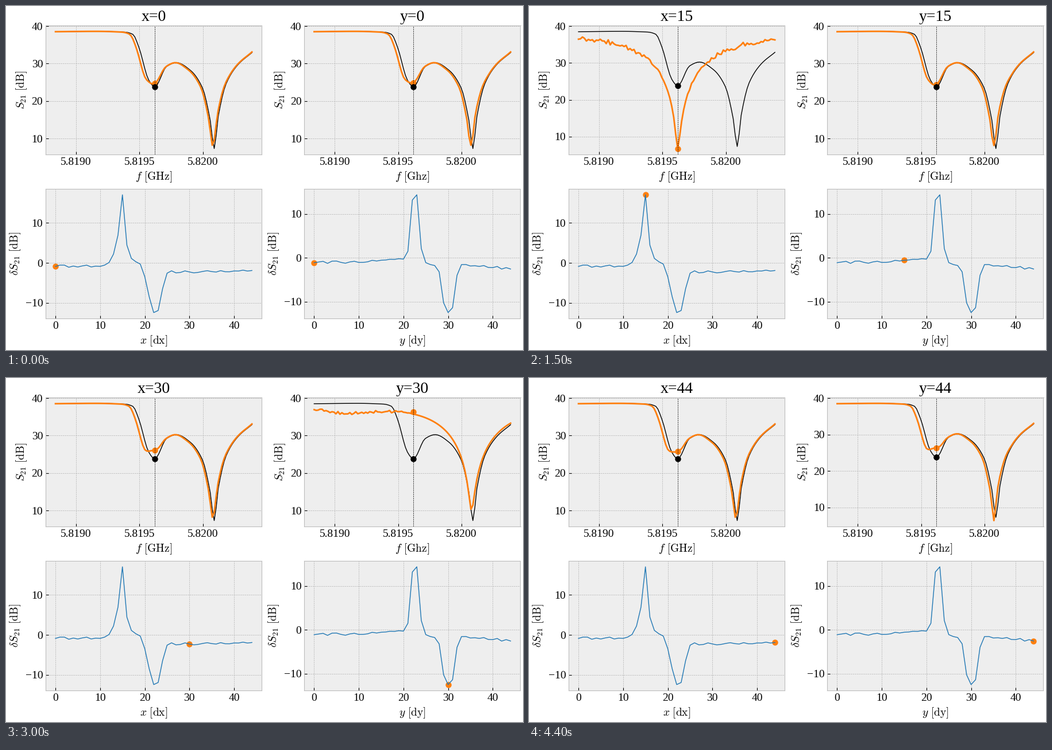
These frames come from a looping animation (900 px wide and 600 px high, 4.5 s). A matplotlib script:

```python
import numpy as np
import matplotlib.pyplot as plt
from matplotlib.animation import FuncAnimation

W, H, DPI = 900, 600, 100
FRAMES, N, MID = 45, 100, 50
ORANGE, BLUE = "#ff7f0e", "#1f77b4"

plt.rcParams.update({
    "font.family": "Liberation Serif", "font.size": 14,
    "mathtext.fontset": "cm",
    "axes.facecolor": "#eeeeee", "axes.edgecolor": "#bcbcbc",
    "axes.grid": True, "axes.axisbelow": True,
    "axes.titlesize": 20, "axes.labelsize": 14,
    "grid.color": "#b2b2b2", "grid.linestyle": "--", "grid.linewidth": 0.5,
    "xtick.direction": "in", "ytick.direction": "in",
})

rng = np.random.default_rng(4)
idx = np.arange(N)
freq = np.linspace(5.818837, 5.820387, N)
steps = np.arange(FRAMES)


def smooth(*points):
    """Monotone cubic through a few (index, dB) points."""
    x, y = np.array(points, float).T
    h, m = np.diff(x), np.diff(y) / np.diff(x)
    prod = m[:-1] * m[1:]
    same = prod > 0
    inner = np.where(same, 2 * prod / np.where(same, m[:-1] + m[1:], 1), 0)
    d = np.concatenate([m[:1], inner, m[-1:]])
    j = np.clip(np.searchsorted(x, idx, side="right") - 1, 0, len(h) - 1)
    t = (idx - x[j]) / h[j]
    ease = t * t * (3 - 2 * t)
    return (y[j] + (y[j + 1] - y[j]) * ease
            + h[j] * t * (1 - t) * (d[j] * (1 - t) - d[j + 1] * t))


def notch(top, at, low, left, right):
    """Resonance dip in dB with its own width on each side."""
    x = idx - at
    b = np.where(x < 0, left, right)
    a = b * 10 ** ((low - top) / 20)
    return top + 10 * np.log10((x**2 + a**2) / (x**2 + b**2))


def rough(size):
    """Noise that fades out towards the marked frequency."""
    return size * rng.normal(size=N) * np.clip(abs(idx - MID) / 10, 0, 1)


def hump(x, at, height, left, right, power):
    width = np.where(x < at, left, right)
    return height * np.exp(-(abs(x - at) / width) ** power)


def change(drift, *humps):
    """Signal change along a scan: slow drift, a peak and a trough."""
    peaks = sum(hump(steps, *h) for h in humps)
    jitter = rng.uniform(-.3, .3, FRAMES) / (1 + abs(peaks))
    return np.interp(steps, *zip(*drift)) + peaks + jitter


REF = smooth((0, 38.5), (22, 38.6), (35, 38.4), (39, 37.8), (42, 34.4),
             (47, 25.6), (50, 23.8), (56, 29.2), (61, 30.25), (68, 28.2),
             (74, 23.6), (78, 14.8), (80, 7.3), (82, 15.8), (86, 24.6),
             (92, 29.7), (99, 32.9))

# Responses with only the first notch (deep) or only the second (flat).
DEEP_X = notch(38, 50, 6.7, 30, 34) + rough(.3)
DEEP_Y = smooth((0, 38.4), (22, 37.5), (32, 36.3), (40, 32.8), (44, 26.1),
                (47, 19.3), (50, 9.4), (52, 16), (60, 20.8), (70, 27),
                (80, 32.2), (99, 35.7)) + rough(.4)
left_half = idx < MID
FLAT_X = (notch(38.5, 79, 9.7, 26, 30) - hump(idx, 0, 1.8, 28, 28, 2)
          + rough(.2) * left_half)
FLAT_Y = (notch(38.5, 79.3, 10, 27, 30) - hump(idx, 16, 1.8, 20, 20, 2)
          + rough(.25) * left_half)

DELTA_X = change([(0, -.8), (9, -.9), (12, -1.6), (19, .2), (27, -2.3), (44, -2)],
                 (15, 17.9, 1.25, .78, 1), (22.4, -12, 2.15, 1.72, 2.2))
DELTA_Y = change([(0, -1.1), (14, -.8), (20, -.1), (27, -1.8), (37, -1.8), (44, -2.6)],
                 (22.55, 17, 1.08, 1.155, 2.3), (30.15, -10.7, 1.745, 1.617, 3.45))


def two_notch(delta, k, dip, fall):
    """Reference pulled to the left, with its first notch lifted by -delta."""
    d = min(delta, 0)
    shift = np.interp(idx, [45, 50, 56, 65, 79, 82, 88],
                      [1.2 - .25 * d, .5 - .2 * d, .3, .8, dip, dip, .4])
    s = np.interp(idx + shift, idx, REF)
    s[-1] = 33.1
    lift = np.exp(-((idx - 49) / 3) ** 2)
    s += (REF[MID] - delta - s[MID]) * lift / lift[MID]
    s[79] = 8.2 - fall * (k / (FRAMES - 1)) ** 3
    return s


def amp(db):
    return 10 ** (db / 20)


def response(k, delta, deep, flat, dip, fall):
    """Two-notch curve, mixed in amplitude with a one-notch curve near a hit."""
    d = delta[k]
    base = two_notch(np.clip(d, -2.7, 1), k, dip, fall)
    if -2.7 <= d <= 1:
        return base
    a, b = amp(base), amp(deep if d > 0 else flat)
    w = (amp(REF[MID] - d) - a[MID]) / (b[MID] - a[MID])
    return 20 * np.log10(a + np.clip(w, 0, 1) * (b - a))


fig = plt.figure(figsize=(W / DPI, H / DPI), dpi=DPI, facecolor="white")


def panel(left, top, bottom, width=376.2):
    return fig.add_axes([left / W, 1 - bottom / H,
                         width / W, (bottom - top) / H])


def padded(lo, hi):
    pad = .05 * (hi - lo)
    return lo - pad, hi + pad


def marker(ax, color, z):
    return ax.plot([], [], "o", color=color, ms=6.5, zorder=z)[0]


class Scan:
    """One column: spectrum above, change along the scan below."""

    def __init__(self, name, left, unit, delta, *shape):
        self.name, self.delta, self.shape = name, delta, shape
        self.top = top = panel(left, 34, 258.9)
        low = panel(left, 319, 545)

        top.plot(freq, REF, color="black", lw=1)
        self.line, = top.plot(freq, REF, color=ORANGE, lw=2)
        top.axvline(freq[MID], color="black", ls="--", lw=.5)
        self.dot = marker(top, ORANGE, 1)
        marker(top, "black", 3).set_data([freq[MID]], [REF[MID]])
        top.set_xlim(*padded(freq[0], freq[-1]))
        ticks = [5.819, 5.8195, 5.82]
        top.set_xticks(ticks, [f"{t:.4f}" for t in ticks])
        top.set_yticks([10, 20, 30, 40])
        top.set_xlabel(rf"$f\ [\mathrm{{{unit}}}]$")
        top.set_ylabel(r"$S_{21}\ [\mathrm{dB}]$")

        low.plot(steps, delta, color=BLUE, lw=1)
        self.low_dot = marker(low, ORANGE, 1)
        low.set_xlim(*padded(0, FRAMES - 1))
        low.set_xticks(range(0, 41, 10))
        low.set_yticks([-10, 0, 10])
        low.set_ylim(*padded(delta.min(), delta.max()))
        low.set_xlabel(rf"${name}\ [\mathrm{{d{name}}}]$")
        low.set_ylabel(r"$\delta S_{21}\ [\mathrm{dB}]$")

    def show(self, k):
        s = response(k, self.delta, *self.shape)
        self.line.set_ydata(s)
        self.dot.set_data([freq[MID]], [REF[MID] - self.delta[k]])
        self.low_dot.set_data([k], [self.delta[k]])
        self.top.set_ylim(*padded(min(s.min(), REF.min()),
                                  max(s.max(), REF.max())))
        self.top.set_title(f"{self.name}={k}")


scans = [
    Scan("x", 69, "GHz", DELTA_X, DEEP_X, FLAT_X, .6, 0),
    Scan("y", 519.3, "Ghz", DELTA_Y, DEEP_Y, FLAT_Y, .95, 1.8),
]


def update(k):
    for scan in scans:
        scan.show(k)
    return []


anim = FuncAnimation(fig, update, frames=FRAMES, interval=100, repeat=True,
                     repeat_delay=0, blit=False)
plt.show()
```
